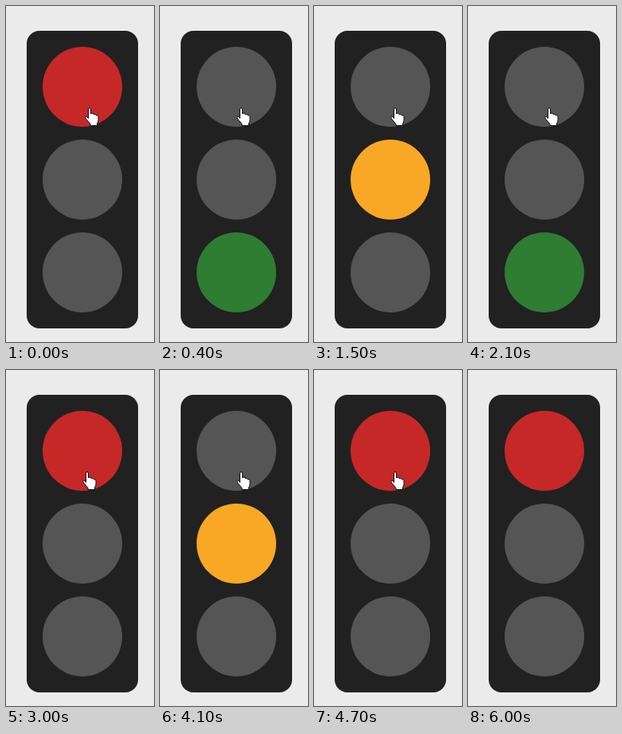
Recreate the animation shown at these times as an HTML page. Size 186 px wide and 420 px high, loop 6400 ms.

```html
<!DOCTYPE html>
<html lang="en">
<head>
<meta charset="utf-8">
<title>Traffic light</title>
<style>
  html, body { margin: 0; height: 100%; overflow: hidden; background: #ebebeb; }
  svg { display: block; width: 100vw; height: 100vh; }
</style>
</head>
<body>
<svg viewBox="0 0 186 420">
  <rect x="26" y="31" width="140" height="372" rx="16" fill="#212121"/>
  <circle class="lamp" cx="96" cy="101" r="50"/>
  <circle class="lamp" cx="96" cy="217" r="50"/>
  <circle class="lamp" cx="96" cy="333" r="50"/>
  <path id="hand" fill="#fff" stroke="#0c0c14" stroke-linejoin="round"
    d="M4.5 13.5V2Q4.5 .5 6 .5T7.500 2V7.500Q10.500 6 11 8.500Q13.500 7.200 14 9.500
       Q17 8.500 17 11.500V15.500Q17 18 15.500 20V22.500H7V20.500L1.500 14
       Q0 11.500 1.500 11Q3 10.800 4.500 13.500Z"/>
</svg>
<script>
const LOOP = 6400;
const OFF = '#555555';
const COLORS = ['#c62828', '#f9a825', '#2e7d32'];
const RED = 0, YELLOW = 1, GREEN = 2;

// [start time in ms, lit lamp]
const signals = [
  [0, RED], [300, YELLOW], [400, GREEN],
  [1100, RED], [1400, YELLOW], [2100, GREEN],
  [2400, RED], [4100, YELLOW], [4300, GREEN],
  [4700, RED]
];

// [start time in ms, x, y]; without a position the pointer is hidden
const pointer = [[0, 99, 127], [100, 96, 127], [5100, 94, 125], [5600]];

const lamps = document.querySelectorAll('.lamp');
const hand = document.getElementById('hand');
const stepAt = (steps, time) => steps.findLast(([start]) => start <= time);

function draw(time) {
  const lit = stepAt(signals, time)[1];
  lamps.forEach((lamp, i) => lamp.setAttribute('fill', i === lit ? COLORS[i] : OFF));

  const [, x, y] = stepAt(pointer, time);
  hand.setAttribute('visibility', x === undefined ? 'hidden' : 'visible');
  if (x !== undefined) hand.setAttribute('transform', `translate(${x} ${y})`);
}

const origin = performance.now();
function tick() {
  draw((performance.now() - origin) % LOOP);
  requestAnimationFrame(tick);
}
tick();
</script>
</body>
</html>
```
